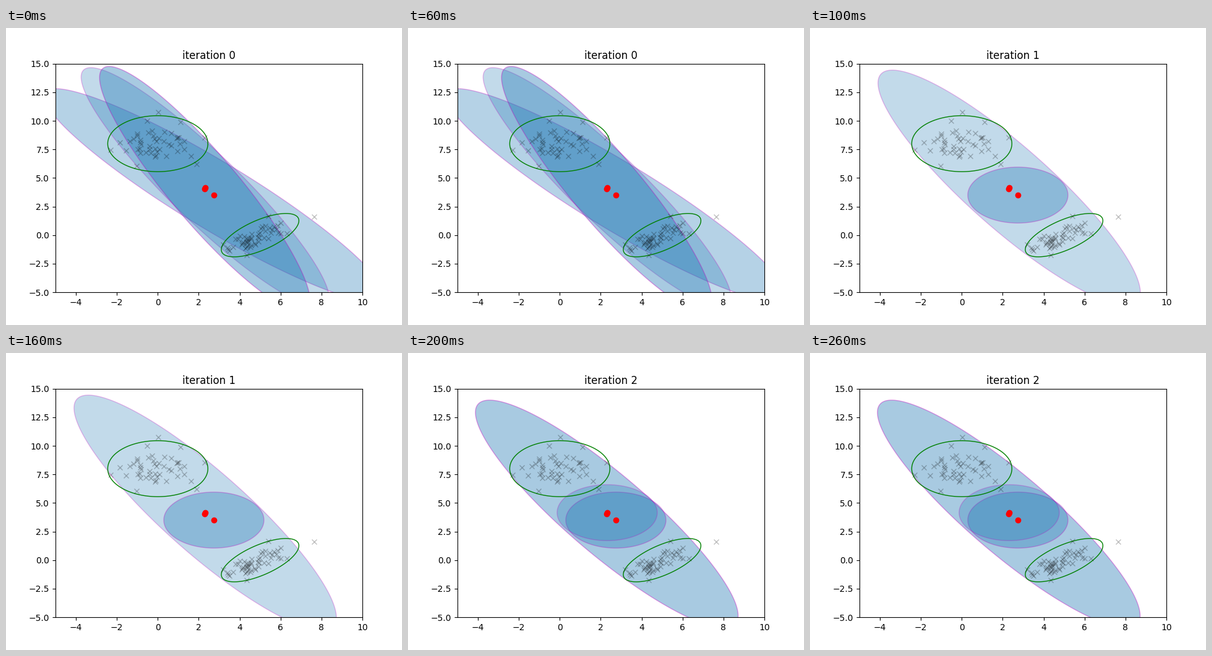
Recreate the animation shown at these times as a matplotlib script. Size 640 by 480 pixels, loop 300 ms.

```python
import numpy as np
import matplotlib.pyplot as plt
from matplotlib.animation import FuncAnimation
from matplotlib.patches import Polygon

R95 = np.sqrt(5.991)  # 95% radius of a unit 2-D Gaussian
TURN = np.linspace(0, 2 * np.pi, 361)
UNIT = (R95, R95, 0)
TILTED = (np.sqrt(0.6) * R95, np.sqrt(0.6) * R95, 2 / 3)

MEANS = [(2.74, 3.505), (2.315, 4.155), (2.295, 4.04)]
WEIGHTS = [0.33, 0.27, 0.39]

# Per iteration: component -> (half width, half height, correlation)
STEPS = [
    {0: (8.317, 9.307, -0.93), 1: (6.063, 10.498, -0.921),
     2: (5.141, 10.714, -0.909)},
    {1: (6.411, 10.28, -0.89), 0: UNIT},
    {2: (6.42, 9.957, -0.892), 0: UNIT, 1: UNIT},
]

# Samples far from their cluster's core
OUTLIERS = [
    (0.03, 10.75), (-0.52, 10), (1.12, 9.9), (2.3, 8.55), (-2.3, 7.45),
    (-1.85, 8.1), (-1.55, 7.4), (-1.05, 6.05), (1.62, 6.9), (1.9, 6.2),
    (7.64, 1.6), (5.4, 1.65), (6.02, 1.05), (3.2, -0.8), (4.33, -1.75),
    (6.3, 0.15),
]


def ellipse(mean, shape, t=TURN, r=1):
    w, h, rho = shape
    c, s = r * np.cos(t), r * np.sin(t)
    return np.column_stack([mean[0] + w * c,
                            mean[1] + h * (rho * c + np.sqrt(1 - rho**2) * s)])


def core(rng, n, mean, shape):
    return ellipse(mean, shape, rng.uniform(0, 2 * np.pi, n),
                   rng.uniform(0, 1, n) ** 0.6)


rng = np.random.default_rng(3)
samples = np.vstack([
    OUTLIERS,
    core(rng, 38, (0, 8), (1.45, 1.25, 0)),
    core(rng, 46, (4.8, -0.2), (1.45, 1.3, 0.75)),
])

fig, ax = plt.subplots(figsize=(6.4, 4.8), dpi=100)


def draw(i):
    ax.clear()
    for k, shape in STEPS[i].items():
        ax.add_patch(Polygon(ellipse(MEANS[k], shape), facecolor="C0",
                             edgecolor="m", alpha=WEIGHTS[k]))
    for mean, shape in (((0, 8), UNIT), ((5, 0), TILTED)):
        ax.add_patch(Polygon(ellipse(mean, shape), fill=False,
                             edgecolor="green"))
    for x, y in samples:
        ax.plot(x, y, "kx", alpha=0.25)
    ax.plot(*zip(*MEANS), "ro")
    ax.set(xlim=(-5, 10), ylim=(-5, 15))
    ax.set_title(f"iteration {i}", pad=5.3)


anim = FuncAnimation(fig, draw, frames=len(STEPS), interval=100,
                     init_func=lambda: None, repeat=True, repeat_delay=0)
plt.show()
```
